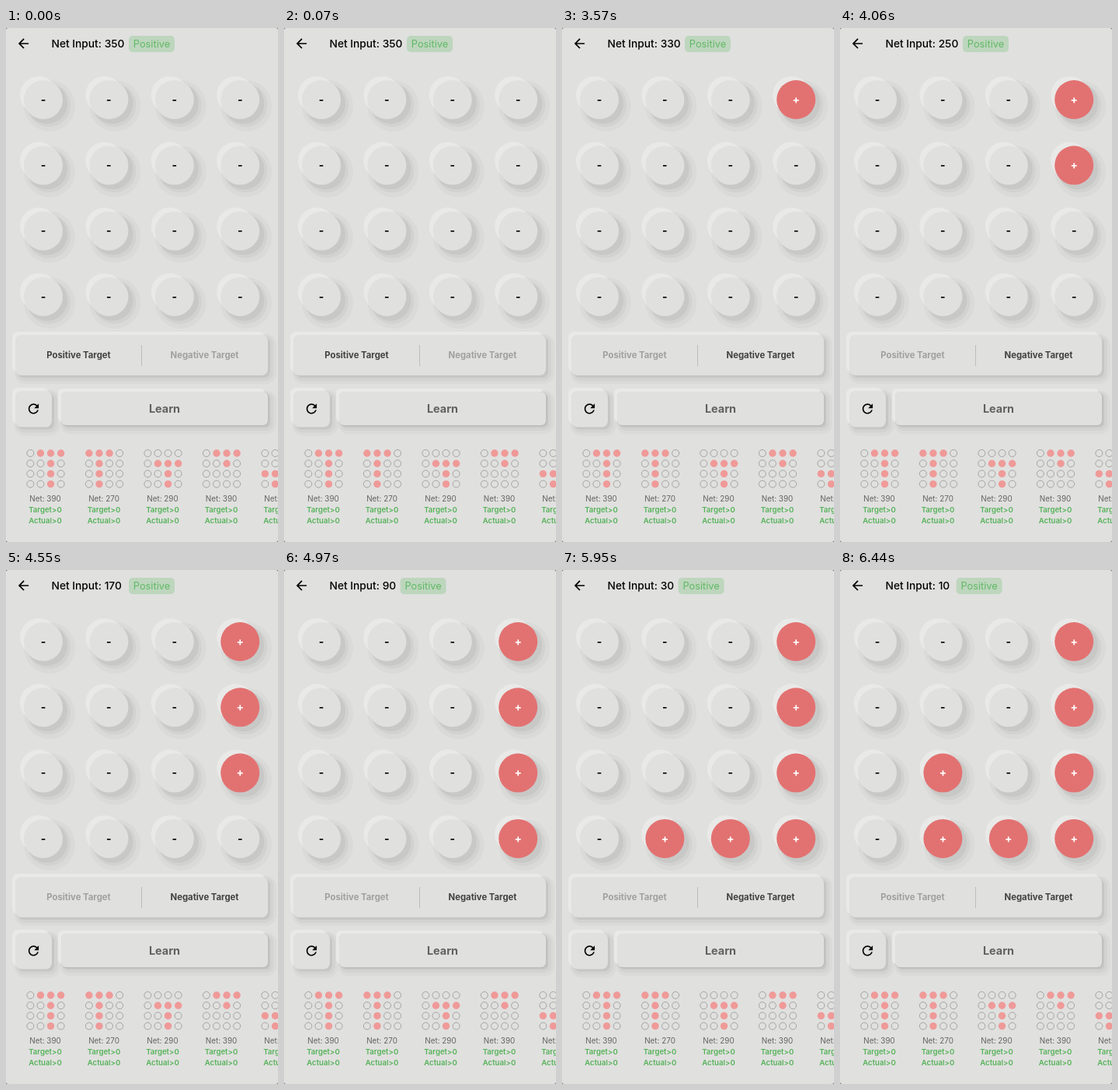
An HTML page that plays this animation: 350x660 px, repeating every 8000 ms.

```html
<!DOCTYPE html>
<html lang="en">
<head>
<meta charset="utf-8">
<title>Perceptron trainer</title>
<style>
  html, body { margin: 0; width: 100%; height: 100%; overflow: hidden; background: #777; }
  svg { display: block; width: 350px; height: 660px; font-family: Inter, Roboto, sans-serif; }
</style>
</head>
<body>
<svg id="stage" viewBox="0 0 350 660"></svg>
<script>
const LOOP = 8000;
const BACKGROUND = '#e0e0df';
const stage = document.getElementById('stage');

// [start ms, net input, number of lit cells]
const steps = [
  [0, 350, 0], [3570, 330, 1], [4060, 250, 2], [4550, 170, 3],
  [4970, 90, 4], [5460, 50, 5], [5950, 30, 6], [6440, 10, 7]
];
const NEGATIVE_AT = 2240;
// Cell indices (row * 4 + column) in the order they light up
const lightOrder = [3, 7, 11, 15, 14, 13, 9];

// Rows of each stored pattern, top to bottom
const samples = [
  ['0111 0010 0010 0010', 390],
  ['1110 0100 0100 0100', 270],
  ['0000 0111 0010 0010', 290],
  ['0111 0010 0000 0000', 390],
  ['0000 0000 1110 0100', 290]
];

function add(tag, attributes, content = '') {
  const node = document.createElementNS('http://www.w3.org/2000/svg', tag);
  for (const name in attributes) node.setAttribute(name, attributes[name]);
  node.textContent = content;
  return stage.appendChild(node);
}

function box(x, y, width, height, rx, fill) {
  return add('rect', { x, y, width, height, rx, fill });
}

function label(content, x, y, size, weight, fill, anchor = 'middle') {
  return add('text', {
    x, y, fill, 'font-size': size, 'font-weight': weight, 'text-anchor': anchor
  }, content);
}

// Soft raised surface: [offset, spread, colour] layers from back to front
function raised(x, y, w, h, r, layers) {
  for (const [offset, spread, fill] of layers) {
    box(x + offset - spread, y + offset - spread,
      w + 2 * spread, h + 2 * spread, r + spread, fill);
  }
  return box(x, y, w, h, r, BACKGROUND);
}

const cellLayers = [
  [8, 8, '#dadad9'], [7, 3, '#d2d2d1'], [5, 1, '#c8c8c7'], [-6, -1, '#e9e9e8']
];
const panelLayers = [
  [5, 6, '#dadad9'], [4, 3, '#d3d3d2'], [3, 0, '#c6c6c5'], [-4, 0, '#e9e9e8']
];

box(0, 0, 350, 660, 3, BACKGROUND);

add('path', {
  d: 'M20 11H7.83l5.59-5.59L12 4l-8 8 8 8 1.41-1.41L7.83 13H20z',
  transform: 'translate(12.5 10) scale(.83)'
});
const netText = label('', 58.5, 25.3, 13.75, 450, '#000', 'start');
const badge = box(158, 10, 59, 21, 5, '#bdd6bd');
const badgeText = label('Positive', 187.5, 25, 12.8, 400, '#62b866');

const cells = Array.from({ length: 16 }, (_, i) => {
  const x = 48 + (i % 4) * 84.4;
  const y = 92 + Math.floor(i / 4) * 84.3;
  const face = raised(x - 25, y - 25, 50, 50, 25, cellLayers);
  return { face, sign: label('-', x, y + 4.8, 14, 700, '#000') };
});

raised(12, 394, 325, 52, 8, panelLayers);
box(174, 407, 1, 27, 0, '#bdbdbd');
const positiveTarget = label('Positive Target', 93.5, 424, 11.3, 700);
const negativeTarget = label('Negative Target', 255.5, 424, 11.3, 700);

raised(12, 466, 47, 46.5, 8, panelLayers);
add('path', {
  d: 'M17.65 6.35A7.96 7.96 0 0 0 12 4c-4.42 0-8 3.58-8 8s3.58 8 8 8c3.73 0 6.84-2.55 7.73-6h-2.08' +
    'A5.99 5.99 0 0 1 12 18c-3.31 0-6-2.69-6-6s2.69-6 6-6c1.66 0 3.14.69 4.22 1.78L13 11h7V4z',
  transform: 'translate(25.5 479) scale(.83)'
});
raised(71, 467, 266, 43, 6, [...panelLayers, [0.6, 0.6, '#bcbcbb']]);
label('Learn', 204, 494, 14.4, 700, '#616161');

samples.forEach(([pattern, net], index) => {
  const center = 50.5 + index * 75.5;
  pattern.split(' ').forEach((row, r) => [...row].forEach((bit, c) => {
    const lit = bit === '1';
    add('circle', {
      cx: center + 0.5 + (c - 1.5) * 13.1, cy: 546 + r * 13.2, r: lit ? 4.7 : 4.5,
      fill: lit ? '#ef9a98' : 'none', stroke: lit ? 'none' : '#9e9e9e', 'stroke-width': 0.9
    });
  }));
  label(`Net: ${net}`, center, 608.3, 9.9, 400, '#646464');
  label('Target>0', center, 622.3, 9.6, 600, '#55b258');
  label('Actual>0', center, 636.3, 9.6, 600, '#55b258');
});

function render(now) {
  const time = now % LOOP;
  const [, net, litCount] = steps.findLast(([start]) => start <= time);
  const lit = lightOrder.slice(0, litCount);
  const negative = time >= NEGATIVE_AT;
  const shift = net < 100 ? -8.4 : 0;

  netText.textContent = `Net Input: ${net}`;
  badge.setAttribute('x', 158 + shift);
  badgeText.setAttribute('x', 187.5 + shift);
  positiveTarget.setAttribute('fill', negative ? '#a0a0a0' : '#424242');
  negativeTarget.setAttribute('fill', negative ? '#424242' : '#a0a0a0');
  cells.forEach(({ face, sign }, i) => {
    const on = lit.includes(i);
    face.setAttribute('fill', on ? '#e27271' : BACKGROUND);
    sign.setAttribute('fill', on ? '#fff' : '#000');
    sign.textContent = on ? '+' : '-';
  });
}

const startTime = performance.now();
function tick() {
  render(performance.now() - startTime);
  requestAnimationFrame(tick);
}
tick();
</script>
</body>
</html>
```
